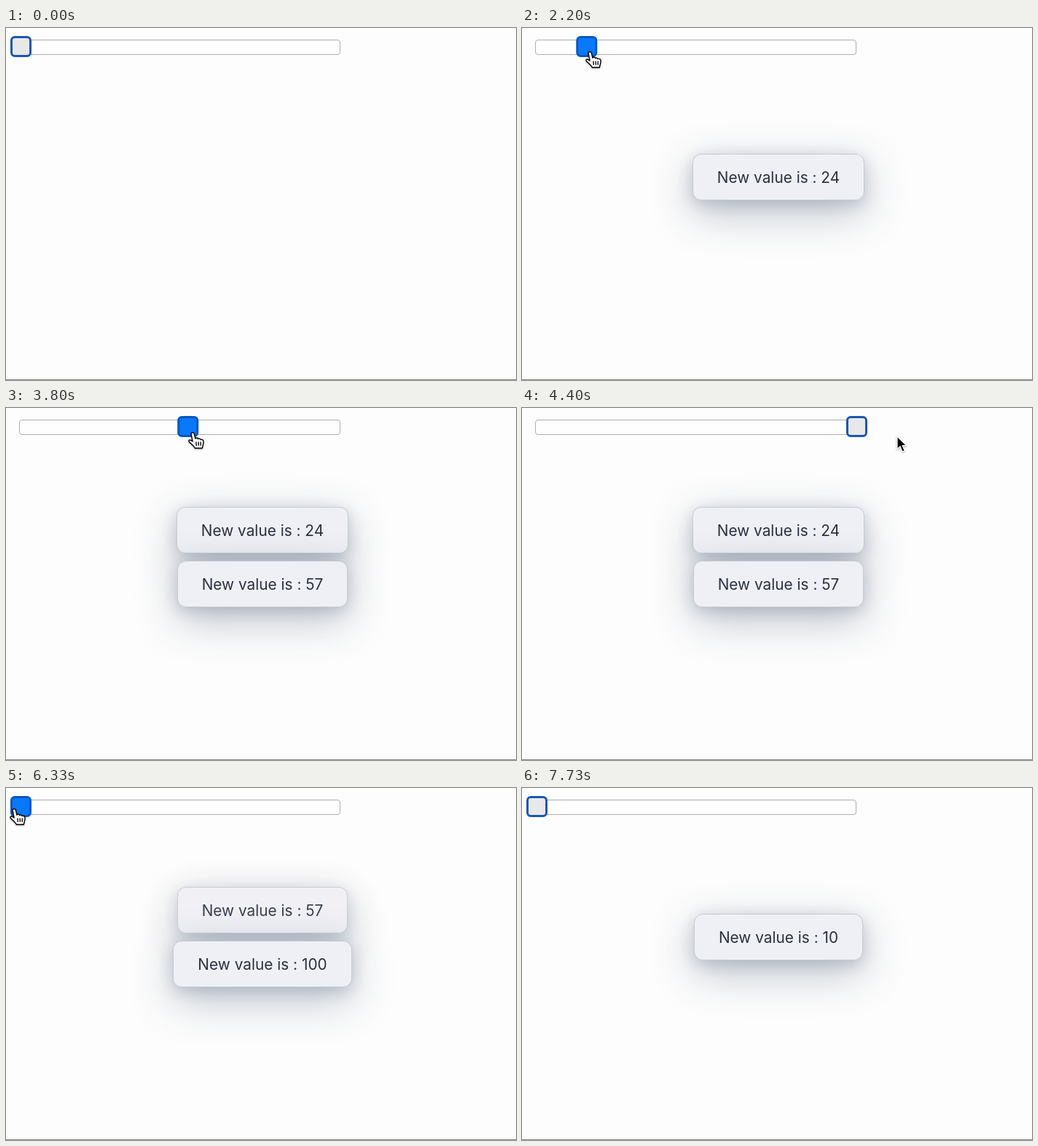
Recreate the animation shown at these times as an HTML page. Size 700x484 px, loop 8000 ms.

```html
<!DOCTYPE html>
<html lang="en">
<head>
<meta charset="utf-8">
<title>Slider with toasts</title>
<style>
  html, body { margin: 0; width: 100%; height: 100%; overflow: hidden; }
  body { position: relative; background: #fdfdfd; }
  body > * { position: absolute; box-sizing: border-box; }
  #track { left: 18px; top: 16px; width: 441px; height: 21px; border: 1px solid #adadaf; border-radius: 4px; background: #fefefe; }
  #handle { left: 0; top: 10.5px; width: 29px; height: 29.5px; border: 3px solid #1a57b0; border-radius: 6px; background: #e8e8e9; }
  #handle.hover { background: #0a78fb; border-color: #0a57c0; }
  #toasts { left: 0; top: 0; width: 704px; height: 410px; display: flex; flex-direction: column; align-items: center; justify-content: center; gap: 10px; }
  .toast {
    position: relative; isolation: isolate; box-sizing: border-box; height: 64px; padding: 0 33px;
    border: 1px solid #c5cad3; border-radius: 12px; background: #eff0f5;
    color: #2a3040; font: 20.8px/63px Inter, sans-serif; white-space: pre;
    box-shadow: 0 5px 20px rgba(40, 60, 85, .2), 0 17px 60px rgba(45, 65, 95, .32);
  }
  #edge { left: 0; top: 483px; width: 700px; height: 1px; background: #858585; }
  #cursor { left: 0; top: 0; width: 1px; height: 1px; overflow: visible; filter: drop-shadow(0 1px 1px rgba(0, 0, 0, .35)); }
</style>
</head>
<body>
<div id="track"></div>
<div id="handle"></div>
<div id="toasts"></div>
<div id="edge"></div>
<svg id="cursor">
  <path id="arrow" d="M0 0V17.5L4 13.8L7 21L10.2 19.7L7.2 12.6H12.5Z" stroke="#fff" stroke-width="1.2"/>
  <g id="hand" transform="translate(-.3 -1.2) scale(1.05)" stroke="#000" stroke-width="1.3" stroke-linejoin="round" stroke-linecap="round">
    <path fill="#fff" d="M-1.6 1.6C-1.2-.5 1.9-.6 2.5 1.5L4 8C4.5 6.4 7 6.5 7.5 8.4C8.5 7.4 10.5 7.9 11 9.4C12.5 8.7 14.5 9.5 14.6 11.5C15 15 13.4 17 13 20.4H3.5C2 16.5-3 14-4.5 11.5C-5 9.3-2.5 9 .4 11.6Z"/>
    <path fill="none" d="M5 12.5l.3 4.2M8 12.5l.2 4.2M11 12.5v4.2"/>
  </g>
</svg>
<script>
const LOOP = 8000, FPS = 15;
const LIFE = 3200, FADE_IN = 200, FADE_OUT = 260;
const MIN = 10, MAX = 100, LEFT = 6, TRAVEL = 439, SIZE = 29;
const REGRAB = 4600, LEAVE = 6400, UNHOVER = 7500;

const $ = id => document.getElementById(id);
const clamp = (v, lo = 0, hi = 1) => Math.min(hi, Math.max(lo, v));
const ease = p => p * p * (3 - 2 * p);

// Pointer glides, each from wherever the previous one ended
const entry = { x: 25, y: -24 };
const glides = [
  { at: 800, time: 400, x: 25, y: 28 },
  { at: 1470, time: 460, x: 93, y: 34 },
  { at: 2730, time: 470, x: 256, y: 35 },
  { at: 3800, time: 530, x: 515, y: 39 },
  { at: REGRAB, time: 400, x: 450, y: 31 },
  { at: 5330, time: 670, x: 11, y: 30 },
  { at: LEAVE, time: 270, x: -2, y: -26 },
];

const pointerAt = t => glides.reduce((from, to) => {
  const p = ease(clamp((t - to.at) / to.time));
  return { x: from.x + (to.x - from.x) * p, y: from.y + (to.y - from.y) * p };
}, entry);

// The handle follows the pointer, held within the track
function valueAt(t) {
  const grab = t < REGRAB ? 19.5 : 5;
  const p = (pointerAt(t).x - grab - LEFT) / TRAVEL;
  return Math.round(MIN + clamp(p) * (MAX - MIN));
}

const toasts = [2000, 3350, 4530, 6650].map(start => {
  const el = document.createElement('div');
  el.className = 'toast';
  el.textContent = `New value is : ${valueAt(start)}`;
  $('toasts').append(el);
  return { el, start };
});

function draw(t) {
  const { x, y } = pointerAt(t);
  const handleX = LEFT + (valueAt(t) - MIN) / (MAX - MIN) * TRAVEL;
  const over = x >= handleX && x <= handleX + SIZE && y >= 11 && y <= 40;
  const lingering = t > LEAVE && t < UNHOVER; // hover outlasts the pointer leaving the page

  $('handle').style.transform = `translateX(${handleX}px)`;
  $('handle').classList.toggle('hover', over || lingering);
  $('cursor').style.transform = `translate(${x}px, ${y}px)`;
  $('hand').style.display = over ? '' : 'none';
  $('arrow').style.display = over ? 'none' : '';

  for (const { el, start } of toasts) {
    const age = t - start;
    el.style.display = age > 0 && age < LIFE ? '' : 'none';
    el.style.opacity = ease(clamp(Math.min(age / FADE_IN, (LIFE - age) / FADE_OUT)));
  }
}

function tick() {
  const t = performance.now() % LOOP;
  draw(Math.floor((t + 4) * FPS / 1000) * 1000 / FPS);
  requestAnimationFrame(tick);
}
tick();
</script>
</body>
</html>
```
